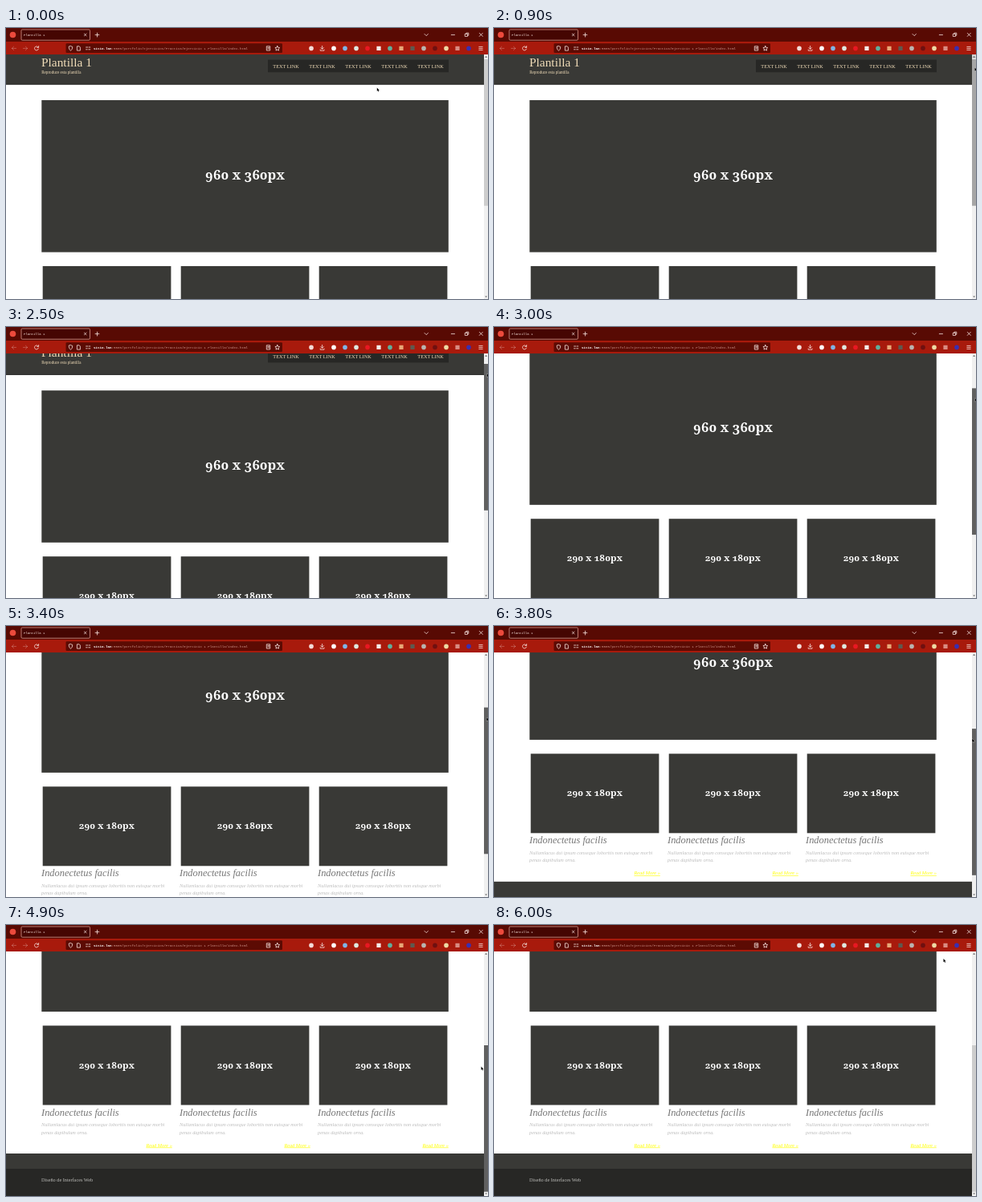
An HTML page that plays this animation: 600 by 338 pixels, repeating every 6200 ms.

```html
<!DOCTYPE html>
<html lang="es">
<head>
<meta charset="utf-8">
<title>Plantilla 1</title>
<style>
  html, body { margin: 0; width: 100%; height: 100%; overflow: hidden; background: #fff; }
  svg { display: block; }
  #stage { width: 100vw; height: 100vh; }
  #page { font-family: "Liberation Serif", serif; font-size: 6.25px; }
  .panel { fill: #393936; }
  .deep { fill: #272725; }
  .sand { fill: #f0dcb8; }
  .mid { text-anchor: middle; }
  .size { font-family: "Noto Serif", serif; font-weight: 600; font-variant-numeric: oldstyle-nums; fill: #fff; text-anchor: middle; }
  .card { font-style: italic; }
  .more { fill: #ff0; text-anchor: end; text-decoration: underline; }
  .mono { font-family: "Liberation Mono", monospace; }
  .line { fill: none; stroke: #f6e4e0; stroke-width: .8; stroke-linecap: round; stroke-linejoin: round; }
  .faded { opacity: .35; }
</style>
</head>
<body>
<svg id="stage" viewBox="0 0 600 338" preserveAspectRatio="none">
  <rect width="600" height="338" fill="#fff"/>

  <svg id="page" y="33" width="595" height="305" viewBox="0 33 595 305">
    <g id="content">
      <rect class="panel" y="33" width="595" height="37.5"/>
      <rect y="69.7" width="595" height=".9" fill="#252523"/>
      <text class="sand" x="44" y="48" font-size="15.4">Plantilla 1</text>
      <text class="sand" x="44.2" y="56.8" font-size="5.1">Reproduce esta plantilla</text>
      <rect class="deep" x="326" y="39.6" width="225" height="15.6"/>
      <g id="links" class="sand mid"></g>

      <rect class="panel" x="44.3" y="90" width="506.5" height="189.6"/>
      <text class="size" x="297.5" y="189" font-size="16.6">960 x 360px</text>
      <g id="cards"></g>

      <rect class="panel" y="456.5" width="595" height="19.5"/>
      <rect class="deep" y="475.5" width="595" height="36"/>
      <text x="44" y="491.6" fill="#bdbdba">Diseño de Interfaces Web</text>
    </g>
  </svg>

  <!-- scrollbar -->
  <rect x="595" y="33" width="5" height="305" fill="#f0f0f0"/>
  <rect id="upButton" x="595" y="33" width="5" height="5.4" fill="#d2d2d2"/>
  <path d="M596.2 36.8l1.4-1.7 1.4 1.7zM596.2 334.4l1.4 1.7 1.4-1.7z" fill="#555"/>
  <rect id="thumb" x="595" y="39" width="5" height="182.7"/>

  <!-- browser frame -->
  <rect width="600" height="17.5" fill="#580a03"/>
  <rect y="17" width="600" height="16" fill="#a81a0c"/>
  <rect x="19" y="2" width="85.5" height="13.2" rx="1.3" fill="#450602" stroke="#d99a90" stroke-width=".8"/>
  <rect x="74.5" y="19.3" width="269.5" height="11.8" rx="1.3" fill="#5c0b03"/>
  <text class="mono" x="22" y="9.8" font-size="4" fill="#f8e8e4">Plantilla 1</text>
  <text class="mono" x="109" y="26.6" font-size="4.16" fill="#cf958c"><tspan fill="#fff" font-weight="bold">sitio.lan</tspan>:5500/portfolio/ejercicios/Practica/Ejercicio 1 Plantilla/index.html</text>

  <g class="line">
    <path d="M97.4 7.2l2.6 2.6m0-2.6l-2.6 2.6M113.5 6.2v4.8m-2.4-2.4h4.8"/>
    <path d="M521 7.5l2.2 2.2 2.2-2.2M554.3 8.6h4.2M589.3 6.4l4 4m0-4l-4 4"/>
    <path d="M571.6 7.4h3v3h-3zM572.8 7.2v-1h3v3h-1"/>
    <path class="faded" d="M12.6 25.4H7.4m2.2-2.2l-2.2 2.2 2.2 2.2M21.4 25.4h5.2m-2.2-2.2l2.2 2.2-2.2 2.2"/>
    <path d="M40.1 24a2.5 2.5 0 1 0 .3 2.2M40.6 22.6v1.8h-1.8"/>
    <path d="M80.5 22.6l2.2.8c0 2.4-.6 3.8-2.2 4.8-1.6-1-2.2-2.4-2.2-4.8z"/>
    <path d="M88.8 22.8h2.4l1.2 1.3v4h-3.6z"/>
    <path d="M99.6 24h2m1.4 0h1.8M99.6 26.8h1.6m1.6 0h2"/>
    <path d="M324.7 22.8h4v5.2h-4zM325.8 24.4h1.8m-1.8 1.5h1.8"/>
    <path d="M337.8 22.4l.9 1.9 2 .3-1.5 1.4.4 2.1-1.8-1-1.8 1 .4-2.1-1.5-1.4 2-.3z"/>
    <path d="M393.6 22.4v3.8m-1.8-1.7l1.8 1.8 1.8-1.8M391.2 27v1.2h4.8V27"/>
    <path d="M588.8 23.4h4.4m-4.4 2h4.4m-4.4 2h4.4"/>
  </g>
  <g id="badges"></g>

  <path id="cursor" d="M0 0v4.3l1-.9.7 1.6.7-.3-.7-1.5h1.3z" fill="#000" stroke="#fff" stroke-width=".45" paint-order="stroke"/>
</svg>

<script>
const LOOP = 6200, STEP = 100, MAX_SCROLL = 171.5, MAX_THUMB = 111;
const $ = id => document.getElementById(id);

$('links').innerHTML = [0, 1, 2, 3, 4]
  .map(i => `<text x="${348.5 + 45 * i}" y="49.7">TEXT LINK</text>`).join('');

$('cards').innerHTML = [44, 216, 388].map(x => `
  <rect class="panel" x="${x + 1.7}" y="297" width="159.7" height="99"/>
  <text class="size" x="${x + 81.3}" y="350" font-size="11.6">290 x 180px</text>
  <g class="card">
    <text x="${x}" y="409" font-size="12.4" fill="#777">Indonectetus facilis</text>
    <g fill="#bcbcbc">
      <text x="${x}" y="422.5">Nullamlacus dui ipsum conseque loborttis non euisque morbi</text>
      <text x="${x}" y="432">penas dapibulum orna.</text>
    </g>
    <text class="more" x="${x + 162.8}" y="448">Read More »</text>
  </g>`).join('');

const dot = (x, y, r, color) => `<circle cx="${x}" cy="${y}" r="${r}" fill="${color}"/>`;
const box = (x, color) => `<rect x="${x - 2.6}" y="22.8" width="5.2" height="5.2" fill="${color}"/>`;
$('badges').innerHTML = dot(8.5, 8.5, 3.8, '#ec4a3c') + [
  [380, '#f3dcd8'], [408, '#fff'], [422, '#7fb4e6'], [436, '#dfe8df'], [450, '#e81822'],
  [464, '#f4ece8', 1], [478, '#5fae9c'], [492, '#e8a878', 1], [506, '#5d5a50', 1],
  [520, '#b9b4b0'], [534, '#6e1010'], [548, '#eed9a4'], [562, '#d98c82', 1], [576, '#3a2fb0']
].map(([x, color, square]) => square ? box(x, color) : dot(x, 25.4, 2.8, color)).join('');

// Each key: [ms, ...values]
const thumbKeys = [[2200, 0], [2300, 1.5], [2500, 7], [3000, 37.4], [3400, 62.6],
  [4100, 109], [4200, 110.6], [4300, MAX_THUMB]];
const cursorKeys = [[0, 461.8, 74.5], [600, 598.5, 47], [700, 598.5, 47], [1000, 598.5, 50.5],
  [2200, 598.5, 50.5], [2500, 598.8, 58], [3000, 598.8, 88.8], [3400, 598.4, 114],
  [4100, 593, 160.5], [4300, 592, 173], [4500, 591.5, 176.5], [5100, 591.5, 176.5],
  [5800, 563.5, 52.5], [6000, 559.5, 42]];

function sample(keys, t) {
  const next = keys.findIndex(key => key[0] > t);
  if (next < 0) return keys.at(-1).slice(1);
  if (next === 0) return keys[0].slice(1);
  const a = keys[next - 1], b = keys[next], k = (t - a[0]) / (b[0] - a[0]);
  return a.slice(1).map((v, i) => v + (b[i + 1] - v) * k);
}

function thumbColor(t) {
  if (t >= 1900 && t < 5200) return '#606060';
  return t >= 600 && t < 1900 ? '#a6a6a6' : '#cdcdcd';
}

function draw(now) {
  const t = Math.floor((now % LOOP + .01) / STEP) * STEP;
  const [thumb] = sample(thumbKeys, t);
  $('content').setAttribute('transform', `translate(0 ${-thumb * MAX_SCROLL / MAX_THUMB})`);
  $('thumb').setAttribute('transform', `translate(0 ${thumb})`);
  $('thumb').setAttribute('fill', thumbColor(t));
  $('upButton').setAttribute('opacity', t >= 600 && t < 2300 ? 1 : 0);
  $('cursor').setAttribute('transform', `translate(${sample(cursorKeys, t).join(' ')})`);
}

const start = performance.now();
function tick() {
  draw(performance.now() - start);
  requestAnimationFrame(tick);
}
tick();
</script>
</body>
</html>
```
